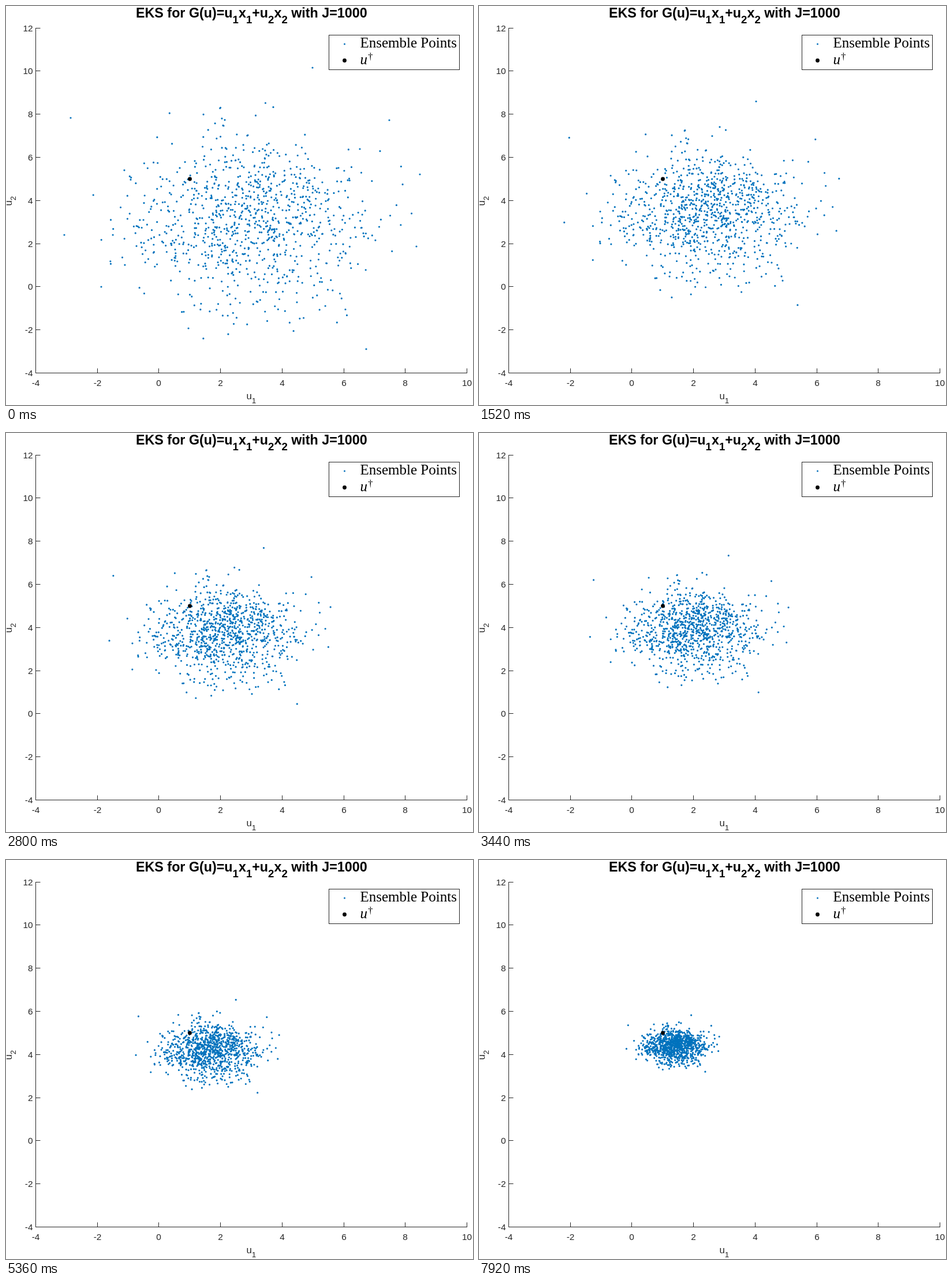
Recreate the animation shown at these times as an HTML page with a canvas. Size 809 px wide and 692 px high, loop 8000 ms.

```html
<!DOCTYPE html>
<html lang="en">
<head>
<meta charset="utf-8">
<title>EKS ensemble</title>
<style>
  html, body { margin: 0; width: 100%; height: 100%; overflow: hidden; background: #fff; }
  canvas, svg { position: absolute; left: 0; top: 0; width: 809px; height: 692px; }
  svg { font-family: "Liberation Sans", Arial, sans-serif; fill: #262626; }
  .line { fill: none; stroke: #262626; stroke-width: 1; }
  .tick { font-size: 15.4px; }
  .label { font-size: 16.8px; }
  .label .sub { font-size: 13.4px; }
  .title { font-size: 23.3px; font-weight: bold; fill: #000; }
  .title .sub { font-size: 18.6px; }
  .legend { font: 25px "Liberation Serif", "Times New Roman", serif; fill: #000; }
</style>
</head>
<body>
<canvas id="cloud" width="809" height="692"></canvas>
<svg viewBox="0 0 809 692">
  <path id="axes" class="line"/>
  <g id="ticks" class="tick"></g>
  <text class="title" x="225" y="20">EKS for G(u)=u<tspan class="sub" dy="9.5">1</tspan><tspan dy="-9.5">x</tspan><tspan class="sub" dy="9.5">1</tspan><tspan dy="-9.5">+u</tspan><tspan class="sub" dy="9.5">2</tspan><tspan dy="-9.5">x</tspan><tspan class="sub" dy="9.5">2</tspan><tspan dy="-9.5"> with J=1000</tspan></text>
  <text class="label" x="416.5" y="682">u<tspan class="sub" dy="6.5">1</tspan></text>
  <text class="label" transform="translate(10 346.5) rotate(-90)">u<tspan class="sub" dy="6.5">2</tspan></text>
  <circle cx="318.5" cy="300" r="3.4" fill="#000"/>
  <rect x="559.5" y="50.5" width="226" height="60" fill="#fff" stroke="#262626"/>
  <circle cx="586.5" cy="66" r="1.5" fill="#0072bd"/>
  <circle cx="586.5" cy="94.5" r="3.4" fill="#000"/>
  <text class="legend" x="613.5" y="72">Ensemble Points</text>
  <text class="legend" x="613.5" y="101"><tspan font-style="italic">u</tspan><tspan font-size="17" dx="1" dy="-8">†</tspan></text>
</svg>
<script>
const COUNT = 1000, STEP = 80, STEPS = 100, DOT = 1.6;
const CENTER = { x: 427, y: 370 }, SIGMA = { x: 98, y: 76 }, REACH = 2.9;

// The outermost points, which set the extent of the cloud
const extremes = [
  [112, 194], [101, 397], [165, 487], [531, 107],
  [664, 198], [717, 292], [711, 417], [624, 595]
];

function randomizer(seed) {
  return () => {
    seed = seed + 0x6d2b79f5 | 0;
    let t = Math.imul(seed ^ seed >>> 15, seed | 1);
    t ^= t + Math.imul(t ^ t >>> 7, t | 61);
    return ((t ^ t >>> 14) >>> 0) / 4294967296;
  };
}

// Normal distribution, cut off at REACH deviations
function makePoints() {
  const random = randomizer(1000);
  const count = COUNT - extremes.length;
  const mass = 1 - Math.exp(-REACH * REACH / 2);
  const inner = Array.from({ length: count }, (_, i) => {
    const r = Math.sqrt(-2 * Math.log(1 - mass * (i + random()) / count));
    const a = random() * 2 * Math.PI;
    return [CENTER.x + SIGMA.x * r * Math.cos(a), CENTER.y + SIGMA.y * r * Math.sin(a)];
  });
  return extremes.concat(inner);
}

function drawAxes() {
  let path = "M51.5 38V636.5H799", labels = "";
  const text = (x, y, anchor, value) =>
    `<text x="${x}" y="${y}" text-anchor="${anchor}">${value}</text>`;
  for (let v = -4; v <= 12; v += 2) {
    const y = Math.round(636 - (v + 4) * 37.4) + 0.5;
    path += `M51.5 ${y}h8`;
    labels += text(46.5, y + 5.5, "end", v);
    if (v > 10) continue;
    const x = Math.round(51 + (v + 4) * 53.36) + 0.5;
    path += `M${x} 636.5v-8`;
    labels += text(x, 658.5, "middle", v);
  }
  document.getElementById("axes").setAttribute("d", path);
  document.getElementById("ticks").innerHTML = labels;
}

const ctx = document.getElementById("cloud").getContext("2d");
const points = makePoints();
let shown = -1;

// The cloud shrinks exponentially towards a slowly drifting focus
function drawCloud(k) {
  const scaleX = Math.exp(-0.01357 * k);
  const scaleY = Math.exp(-0.0172 * k + 1e-5 * k * k);
  const focusX = 306 + 0.04 * k;
  const focusY = 326 - 0.43 * k + 0.0027 * k * k;
  ctx.clearRect(0, 0, 809, 692);
  ctx.fillStyle = "#0072bd";
  ctx.beginPath();
  for (const [px, py] of points) {
    const x = focusX + (px - focusX) * scaleX;
    const y = focusY + (py - focusY) * scaleY;
    ctx.moveTo(x + DOT, y);
    ctx.arc(x, y, DOT, 0, 2 * Math.PI);
  }
  ctx.fill();
}

function tick() {
  const k = Math.floor(performance.now() / STEP) % STEPS;
  if (k !== shown) drawCloud(shown = k);
  requestAnimationFrame(tick);
}

drawAxes();
tick();
</script>
</body>
</html>
```
